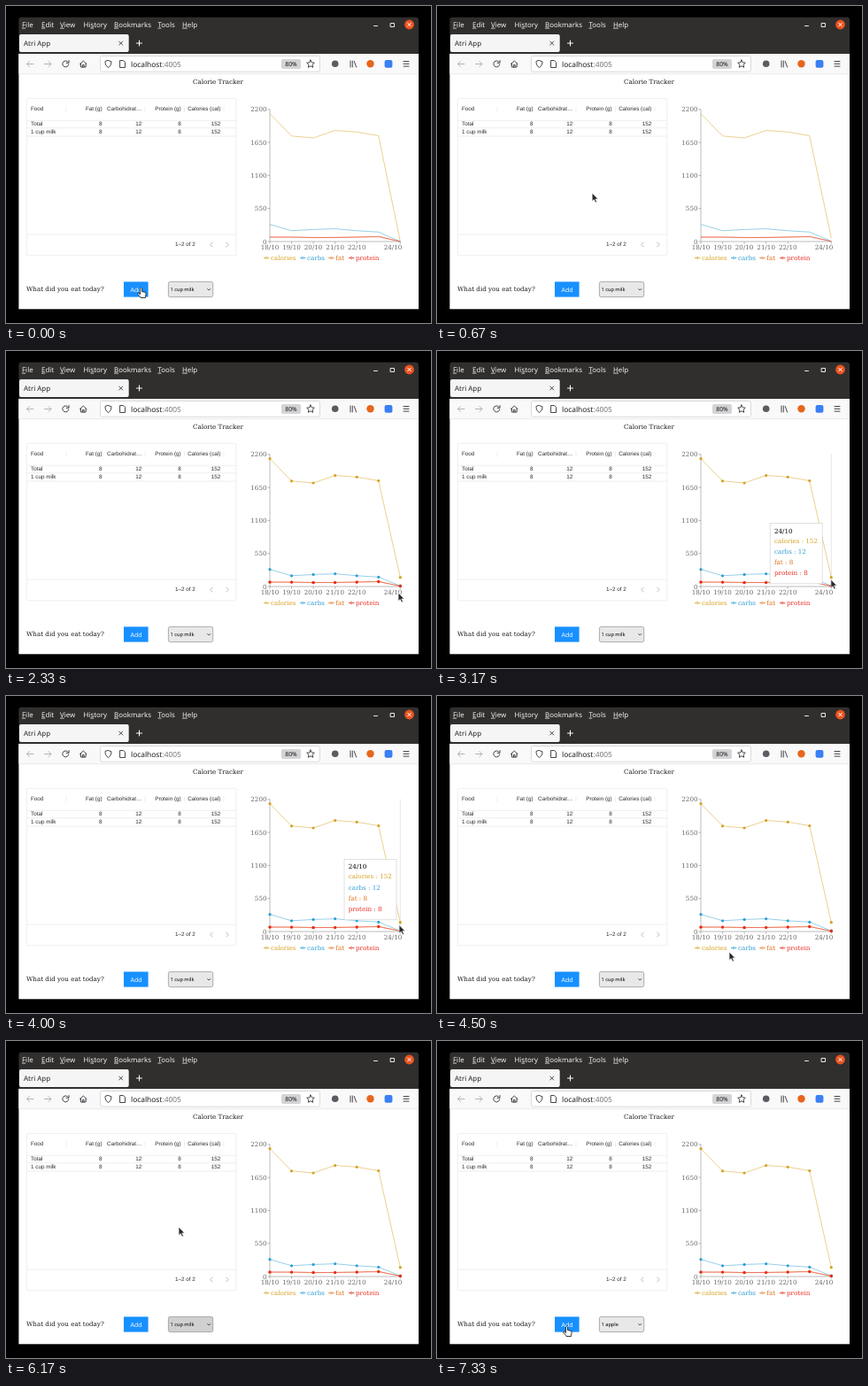
An HTML page that plays this animation: 480x358 px, repeating every 8000 ms.

```html
<!DOCTYPE html>
<html lang="en">
<head>
<meta charset="utf-8">
<title>Calorie Tracker</title>
<style>
  html, body { margin: 0; width: 100%; height: 100%; overflow: hidden; background: #000; }
  svg { display: block; width: 480px; height: 358px; }
  text { white-space: pre; text-rendering: geometricPrecision; }
  .ui { font-family: "Noto Sans", "Open Sans", sans-serif; font-size: 7.9px; }
  .grid { font-family: "Liberation Sans", Arial, sans-serif; font-size: 6.3px; fill: #2a2a2a; }
  .serif { font-family: "DejaVu Serif", serif; font-size: 7.15px; }
  .end { text-anchor: end; }
  .mid { text-anchor: middle; }
  .icon { fill: none; stroke: #45454c; stroke-width: 1; stroke-linecap: round; stroke-linejoin: round; }
  .pale { stroke: #b4b4ba; }
  .rule { fill: none; stroke: #e2e2e2; stroke-width: .6; }
  .axis { fill: none; stroke: #777; stroke-width: .5; }
</style>
</head>
<body>
<svg viewBox="0 0 480 358">
  <rect width="480" height="358"/>

  <!-- browser window -->
  <rect x="14.400" y="54" width="451.600" height="288.300" fill="#fff"/>
  <path d="M14.400 54V16q0-3.200 3.200-3.200h445.200q3.200 0 3.200 3.200v38z" fill="#302f2d"/>
  <g id="menu" class="ui" fill="#f2f2f0"></g>
  <path class="icon" style="stroke:#e8e8e8" d="M415.500 22.500h4M434.500 19.500h4v4h-4z"/>
  <circle cx="455.500" cy="21" r="5.400" fill="#e95420"/>
  <path class="icon" style="stroke:#fff" d="M453.700 19.200l3.600 3.600m0-3.600l-3.600 3.600"/>
  <rect x="15" y="32" width="123.700" height="20" rx="2" fill="#f6f5f6"/>
  <text class="ui" x="20" y="45" fill="#222">Atri App</text>
  <path class="icon" d="M127.700 40l4 4m0-4l-4 4"/>
  <path class="icon" style="stroke:#fff" d="M147.500 42h6m-3-3v6"/>
  <rect x="14.400" y="54" width="451.600" height="22.500" fill="#f9f9fa"/>
  <path d="M14.400 76.700h451.600" stroke="#dcdcde" stroke-width=".6"/>
  <path class="icon pale" d="M31 65.500h-7.500m3-3l-3 3 3 3M43.500 65.500h7.500m-3-3l3 3-3 3"/>
  <path class="icon" d="M70.300 63.500a3.500 3.500 0 1 0 .5 2.500M71 61.500v2.800h-2.800M83.500 65.500l3.800-3.500 3.800 3.500M84.500 65v4h5.600v-4M86.500 69v-2.500h1.600V69"/>
  <rect x="106.500" y="56.500" width="248" height="17.700" rx="2" fill="#fff" stroke="#d2d2d5" stroke-width=".8"/>
  <path class="icon" d="M115.500 61.500l3.500 1.300c0 3.200-1 5.200-3.500 6.700-2.500-1.500-3.500-3.500-3.500-6.700zM129 61.500h3.500l2 2v6h-5.500z"/>
  <text class="ui" x="141" y="68.500" style="font-size:8.4px" fill="#1c1b22">localhost<tspan fill="#77777d">:4005</tspan></text>
  <rect x="311" y="60" width="22" height="11" rx="2" fill="#d4d4d6"/>
  <text class="ui mid" x="322" y="68" style="font-size:6.800px" fill="#15141a">80%</text>
  <path class="icon" d="M344 61l1.300 2.800 3 .4-2.200 2.100.6 3-2.700-1.500-2.700 1.500.6-3-2.200-2.100 3-.4z"/>
  <circle cx="371.700" cy="65.300" r="3.800" fill="#5b5b62"/>
  <path class="icon" d="M389 62v7M391.300 62v7M393.300 62.500l2.300 6.500M449 62.500h6M449 65.300h6M449 68.100h6"/>
  <circle cx="411.500" cy="65.300" r="4.200" fill="#e8651c"/>
  <rect x="427.600" y="61" width="8.800" height="8.800" rx="2" fill="#3b7ff5"/>

  <!-- page -->
  <text class="serif mid" x="239.500" y="88" fill="#1a1a1a">Calorie Tracker</text>
  <rect id="hover" x="23.300" width="236.400" height="9.300" fill="#f4f4f4"/>
  <rect class="rule" x="23.300" y="104.300" width="236.500" height="177.500" rx="1.500"/>
  <path class="rule" d="M23.300 129.300h236.500m-236.500 8.500h236.500m-236.500 9.300h236.500m-236.500 111h236.500"/>
  <path class="rule" d="M68 113.500v6M157 113.500v6M201.500 113.500v6M246 113.500v6"/>
  <g id="table" class="grid"></g>
  <text class="grid" x="191" y="271.300">1–2 of 2</text>
  <path class="icon" style="stroke:#aaa;stroke-width:.8" d="M233.300 267l-2.500 2.500 2.500 2.500M248.700 267l2.500 2.500-2.500 2.500"/>

  <text class="serif" x="23" y="322.300" fill="#1a1a1a">What did you eat today?</text>
  <rect x="133" y="311.400" width="27.600" height="17.200" fill="#1890ff"/>
  <text class="ui mid" x="147" y="322.500" style="font-size:6.900px" fill="#fff">Add</text>
  <rect id="select" x="183.400" y="311.400" width="50.300" height="17.200" rx="2" stroke="#8f8f96" stroke-width=".7"/>
  <text id="choice" class="ui" x="185.600" y="322" style="font-size:5.600px"></text>
  <path class="icon" style="stroke:#222;stroke-width:.8" d="M227.700 319.500l1.500 1.500 1.500-1.500"/>

  <g id="axes" class="serif" fill="#666"></g>
  <path id="marker" stroke="#ccc" stroke-width=".5"/>
  <g id="lines"></g>
  <g id="dots"></g>
  <g id="legend" class="serif"></g>
  <g id="tooltip" class="serif"></g>

  <g id="pointer" stroke-linejoin="round">
    <path id="arrow" fill="#2b2b2b" stroke="#fff" stroke-width=".7" d="M0 0V9.500L2.200 7.600 3.800 11 5.500 10.300 3.900 6.900H6.800Z"/>
    <path id="hand" fill="#fff" stroke="#222" stroke-width=".9" d="M-1 1q1-1.500 2 0v3.500l3.600.8q1.200.4 1.100 1.700l-.7 3.200v1.300h-5.500v-.8L-3.800 7.500q-.4-1.300 1-1.200L-1 7.600z"/>
  </g>
</svg>
<script>
const $ = id => document.getElementById(id);
const text = (x, y, label, attrs = '') => `<text x="${x}" y="${y}" ${attrs}>${label}</text>`;
const LOOP = 8, FPS = 6;

const menu = [[18, '_File'], [40, '_Edit'], [61, '_View'], [87.5, 'Hi_story'],
  [122, '_Bookmarks'], [171.5, '_Tools'], [199, '_Help']];
$('menu').innerHTML = menu.map(([x, label]) =>
  text(x, 23.7, label.replace(/_(.)/, '<tspan text-decoration="underline">$1</tspan>'))).join('');

const columns = [28, 108.5, 153.3, 197.7, 242.3];
const rows = [
  [118.3, 'Food', 'Fat (g)', 'Carbohidrat…', 'Protein (g)', 'Calories (cal)'],
  [134.8, 'Total', 8, 12, 8, 152],
  [144, '1 cup milk', 8, 12, 8, 152]];
$('table').innerHTML = rows.map(([y, ...cells]) => cells.map((cell, i) =>
  text(columns[i], y, cell, i ? 'class="end"' : '')).join('')).join('');

// chart
const plot = { left: 298, right: 445.3, top: 116.5, bottom: 266 };
const step = (plot.right - plot.left) / 6;
const px = i => plot.left + i * step;
const py = value => plot.bottom - value * 149.2 / 2200;
const dates = [18, 19, 20, 21, 22, 23, 24].map(day => day + '/10');
const series = [
  { name: 'calories', color: '#d6a121', legendX: 291, values: [2130, 1757, 1725, 1850, 1824, 1762, 152] },
  { name: 'carbs', color: '#2f9fd3', legendX: 332, values: [285, 180, 200, 212, 180, 158, 12] },
  { name: 'fat', color: '#e0701a', legendX: 364.3, values: [70, 72, 64, 70, 76, 86, 8] },
  { name: 'protein', color: '#ea2a20', legendX: 387, values: [76, 74, 68, 66, 72, 80, 8] }];

const ticks = [0, 550, 1100, 1650, 2200];
$('axes').innerHTML =
  `<path class="axis" d="M${px(0)} ${plot.top}V${plot.bottom}H${px(6)}` +
  ticks.map(v => `M${px(0)} ${py(v)}h-2.700`).join('') +
  [0, 1, 2, 3, 4, 6].map(i => `M${px(i)} ${plot.bottom}v2.700`).join('') + '"/>' +
  ticks.map(v => text(294.5, py(v) + 2.6, v, 'class="end"')).join('') +
  dates.map((d, i) => i === 5 ? '' : text(i === 6 ? 437 : px(i), 274.7, d, 'class="mid"')).join('');

$('legend').innerHTML = series.map(({ name, color, legendX: x }) =>
  `<path d="M${x} 284.500h2.100a1.050 1.050 0 1 1 2.100 0a1.050 1.050 0 1 1-2.100 0m2.100 0h2.100"
    fill="none" stroke="${color}" stroke-width=".8"/>` + text(x + 8, 286.8, name, `fill="${color}"`)).join('');

$('lines').innerHTML = series.map(s => `<path fill="none" stroke="${s.color}" stroke-width=".5"/>`).join('');
$('dots').innerHTML = series.map(s => s.values.map((v, i) =>
  `<circle cx="${px(i)}" cy="${py(v)}" r="1.600" fill="${s.color}"/>`).join('')).join('');

const clamp = v => Math.min(1, Math.max(0, v));
const ease = v => v * v * (3 - 2 * v);
const mix = (a, b, k) => a + (b - a) * k;

// pointer stops: seconds, x, y
const stops = [[0, 152.5, 318], [1.17, 190, 141], [1.5, 190, 140.5], [2.17, 425, 232], [2.33, 443, 273],
  [2.5, 444, 267], [2.67, 445.6, 257], [3, 445, 258], [3.67, 444, 258.5], [4, 444, 258.5],
  [5, 216, 319.5], [5.17, 217, 319], [6.17, 195, 210], [6.33, 195, 210], [7.33, 146.5, 322], [8, 146.5, 322]];

function pointerAt(t) {
  const i = stops.findIndex(stop => stop[0] > t);
  const [a, b] = [stops[i - 1], stops[i]];
  const k = ease((t - a[0]) / (b[0] - a[0]));
  return [mix(a[1], b[1], k), mix(a[2], b[2], k)];
}

const show = (id, visible) => $(id).setAttribute('visibility', visible ? 'visible' : 'hidden');

function drawTooltip(t, x, y) {
  const inside = x >= plot.left && x <= plot.right && y < plot.bottom && y > plot.top;
  const active = inside && t < 4.1;
  show('tooltip', active);
  show('marker', active);
  if (!active) return;
  const i = Math.round((x - plot.left) / step);
  const width = i === 6 ? 59 : 63.5;
  let left = px(i) + 4.5, top = y + 4.5;
  if (left + width > plot.right) left = px(i) - width - 4.5;
  if (t > 2.9) {
    const k = 1 - (1 - clamp((t - 3) / .4)) ** 3;
    left = mix(352.5, 382, k);
    top = mix(235, 184.3, k);
  }
  $('marker').setAttribute('d', `M${px(i)} ${plot.top}V${plot.bottom}`);
  $('tooltip').setAttribute('transform', `translate(${left} ${top})`);
  $('tooltip').innerHTML =
    `<rect width="${width}" height="68.500" fill="#fff" stroke="#ccc" stroke-width=".6"/>` +
    text(4.8, 11.2, dates[i]) + series.map((s, n) =>
      text(4.8, 22.2 + n * 12.3, `${s.name} : ${s.values[i]}`, `fill="${s.color}"`)).join('');
}

function draw(t) {
  const [x, y] = pointerAt(t);
  const overAdd = x > 133 && x < 161 && y > 311 && y < 329;
  $('pointer').setAttribute('transform', `translate(${x} ${y})`);
  show('hand', overAdd);
  show('arrow', !overAdd);

  const overRow = x > 23 && x < 260 && y > 129.3 && y < 147;
  show('hover', overRow);
  $('hover').setAttribute('y', y < 137.8 ? 129 : 137.8);

  const selecting = t > 4.8 && t < 6.3;
  $('select').setAttribute('fill', selecting ? '#d0d0d1' : '#e8e8e9');
  $('choice').textContent = t < 6.3 ? '1 cup milk' : '1 apple';

  const grown = ease(clamp((t - .1) / 1.3));
  series.forEach(({ values }, n) => {
    const points = values.map((v, i) => `${px(i)} ${py(i === 6 ? v * grown : v)}`);
    $('lines').children[n].setAttribute('d', 'M' + points.join('L'));
  });
  show('dots', t > 1.6);
  drawTooltip(t, x, y);
}

function tick() {
  const seconds = performance.now() / 1000 % LOOP;
  const frame = Math.floor(seconds * FPS + .05) % (LOOP * FPS);
  draw(frame / FPS);
  requestAnimationFrame(tick);
}
tick();
</script>
</body>
</html>
```
